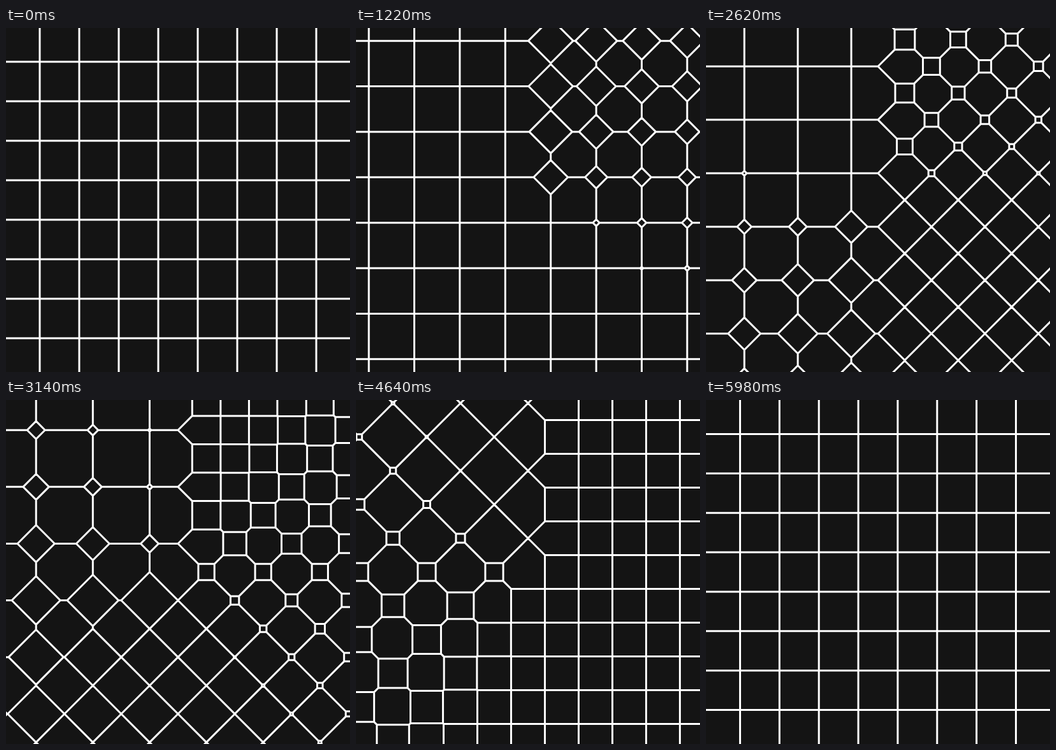
An HTML page that plays this animation: 540 px wide and 540 px high, repeating every 6000 ms.

```html
<!DOCTYPE html>
<html lang="en">
<head>
<meta charset="utf-8">
<title>Grid sweep</title>
<style>
  html, body { margin: 0; width: 100%; height: 100%; overflow: hidden; background: #141414; }
  svg { display: block; width: 100%; height: 100%; }
  path { fill: none; stroke: #fff; stroke-width: 3; stroke-linecap: round; stroke-linejoin: miter; }
</style>
</head>
<body>
<svg viewBox="0 0 540 540"><path id="lines"/></svg>
<script>
const LOOP = 6000;
const SWEEP = 3060;        // time for a wave to go once around the centre
const GROW = 1240;         // time one node takes to open
const SQUARE_DELAY = 1700; // the second wave follows the first by this much
const CELL = 62, CENTER = 270, REACH = 6, EPS = 1e-4;
const lines = document.getElementById('lines');

const smooth = u => {
  const c = Math.min(1, Math.max(0, u));
  return c * c * (3 - 2 * c);
};

// Clockwise turn from straight up, in (0, 1].
const turn = (x, y) => {
  const a = Math.atan2(x, -y) / (2 * Math.PI);
  return a <= 0 ? a + 1 : a;
};

const opening = (x, y, time) => smooth((time - SWEEP * turn(x, y)) / GROW);

function draw(time) {
  const scale = CELL * 2 ** (time / LOOP);
  const diamond = (x, y) => opening(x, y, time) / 2;
  const square = (x, y) => opening(x, y, time - SQUARE_DELAY) / 4;
  const point = (x, y) =>
    (CENTER + x * scale).toFixed(2) + ' ' + (CENTER + y * scale).toFixed(2);
  const segment = (x1, y1, x2, y2) => 'M' + point(x1, y1) + 'L' + point(x2, y2);
  let d = '';

  for (let i = -REACH; i < REACH; i++) {
    for (let j = -REACH; j < REACH; j++) {
      const x = i + 0.5, y = j + 0.5, r = diamond(x, y);

      // Straight links to the right and lower neighbours, with a square at each middle.
      for (const [dx, dy] of [[1, 0], [0, 1]]) {
        const next = 1 - diamond(x + dx, y + dy);
        if (next - r > EPS) {
          d += segment(x + dx * r, y + dy * r, x + dx * next, y + dy * next);
        }
        const mx = x + dx / 2, my = y + dy / 2, h = square(mx, my);
        if (h > EPS) {
          d += 'M' + [point(mx - h, my - h), point(mx + h, my - h),
                      point(mx + h, my + h), point(mx - h, my + h)].join('L') + 'Z';
        }
      }

      // Diamond sides, shortened where squares have opened at their ends.
      for (const sx of [-1, 1]) {
        for (const sy of [-1, 1]) {
          const a = square(x + sx / 2, y), b = square(x, y + sy / 2);
          if (r - a - b > EPS) {
            d += segment(x + sx * (r - a), y + sy * a, x + sx * b, y + sy * (r - b));
          }
        }
      }
    }
  }
  lines.setAttribute('d', d);
}

function frame() {
  draw(performance.now() % LOOP);
  requestAnimationFrame(frame);
}
frame();
</script>
</body>
</html>
```
